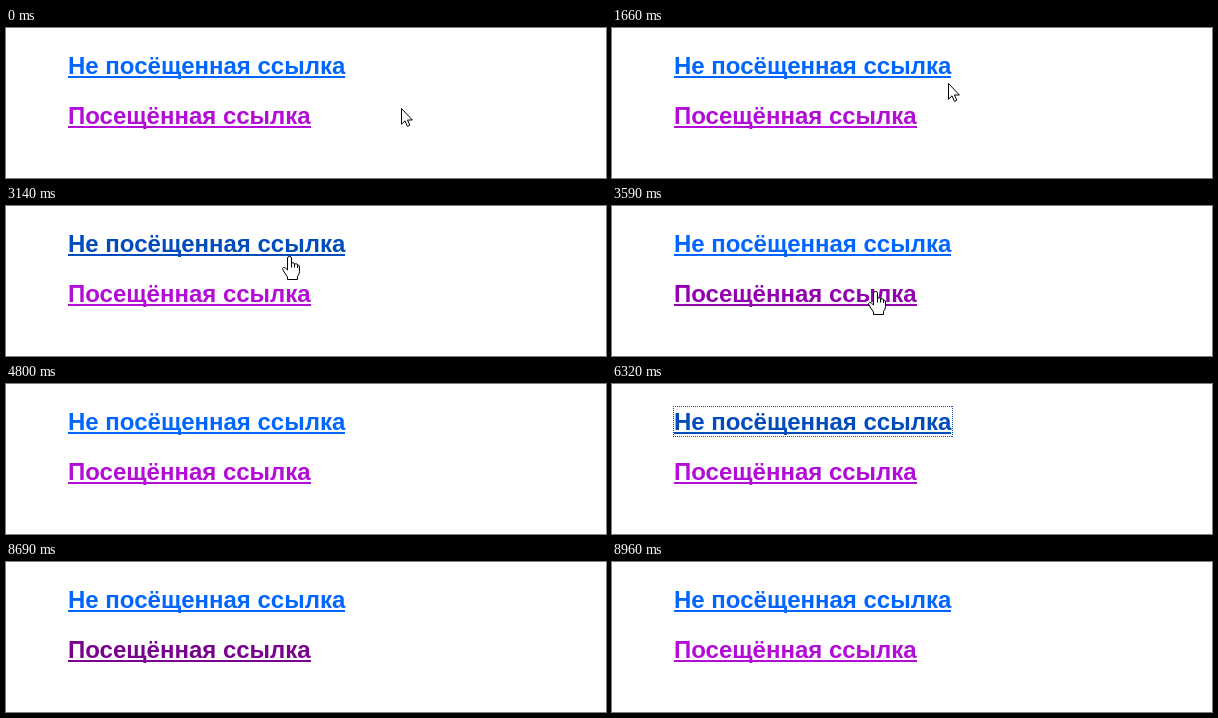
Animation of 600 by 150 pixels, one loop 9840 ms. Source, as an HTML page with a canvas:

```html
<!DOCTYPE html>
<html lang="ru">
<head>
<meta charset="utf-8">
<title>Ссылки</title>
<style>
  html, body { margin: 0; width: 100%; height: 100%; overflow: hidden; background: #fff; }
  .link {
    position: absolute; left: 62px; height: 27px;
    font: bold 24px/27px "Liberation Sans", Arial, sans-serif;
    white-space: nowrap;
  }
  .link::after {
    content: ""; position: absolute; left: 0; top: 24px;
    width: 100%; height: 2px; background: currentColor;
  }
  #fresh { top: 24px; }
  #visited { top: 74px; }
  canvas { position: absolute; left: 0; top: 0; }
</style>
</head>
<body>
<span class="link" id="fresh">Не посёщенная ссылка</span>
<span class="link" id="visited">Посещённая ссылка</span>
<canvas id="stage" width="600" height="150"></canvas>
<script>
const LOOP = 9840;
const ctx = document.getElementById('stage').getContext('2d');
const fresh = document.getElementById('fresh');
const visited = document.getElementById('visited');

const BLUE = [0, 102, 255], BLUE_DARK = [0, 76, 188];
const PURPLE = [178, 12, 214], PURPLE_HOVER = [146, 0, 176], PURPLE_FOCUS = [107, 0, 125];

// Pointer keys: time, x, y; the pose holds until the next key.
const pointer = [
  [0, 395, 80], [1300, 394, 80], [1480, 384, 76], [1570, 362, 66],
  [1660, 336, 55], [1750, 311, 51], [1840, 292, 49], [1930, 285, 49],
  [3140, 284, 50], [3230, 282, 54], [3320, 277, 64], [3410, 271, 75],
  [3500, 266, 82], [3590, 264, 85], [4520, 264, 89], [4610, 264, 106],
  [4700, 264, 130], [4800, 264, 160]
];
const ticks = pointer.map(k => k[0]).concat([6320, 7580, 7680, 8690, 8780, 8960]);

// Colour changes: start, duration, colour.
const freshFades = [
  [0, 0, BLUE], [1750, 0, BLUE_DARK], [3180, 270, BLUE],
  [6320, 0, BLUE_DARK], [7470, 210, BLUE]
];
const visitedFades = [
  [0, 0, PURPLE], [3410, 0, PURPLE_HOVER], [4560, 240, PURPLE],
  [7580, 0, PURPLE_FOCUS], [8640, 270, PURPLE]
];

const css = c => `rgb(${c.map(Math.round).join(',')})`;

function colourAt(fades, t) {
  let i = fades.length - 1;
  while (fades[i][0] > t) i--;
  const [start, length, to] = fades[i];
  if (!length) return to;
  const p = Math.min(1, (t - start) / length);
  return fades[i - 1][2].map((v, n) => v + (to[n] - v) * p);
}

function focusRing(x, y, w, h, colour) {
  ctx.fillStyle = css(colour);
  for (let i = 0; i < w; i += 2) {
    ctx.fillRect(x + i, y, 1, 1);
    ctx.fillRect(x + i, y + h - 1, 1, 1);
  }
  for (let j = 0; j < h; j += 2) {
    ctx.fillRect(x, y + j, 1, 1);
    ctx.fillRect(x + w - 1, y + j, 1, 1);
  }
}

const arrow = new Path2D('M.5 .5V16.2L4 12.8L6.4 18.4L8.8 17.3L6.5 12H11.4Z');
const hand = new Path2D(
  'M-2.5 14V2Q-2.5 .5 -.5 .5Q1.5 .5 1.5 2V7Q4.5 6 4.5 8Q7.5 7 7.5 9' +
  'Q9.5 8.7 9.5 11V15.5Q9.5 18 7.5 20.5V23.5H-2.5V21Q-4.5 18.5 -7 14' +
  'Q-8 12 -6.5 11.5Q-5 11 -2.5 14Z');
const knuckles = new Path2D('M1.5 7V11.5M4.5 8V11.5M7.5 9V12');

function drawPointer(x, y, isHand) {
  ctx.save();
  ctx.translate(x, y);
  ctx.fillStyle = '#fff';
  ctx.strokeStyle = '#000';
  ctx.lineWidth = 1;
  const shape = isHand ? hand : arrow;
  ctx.fill(shape);
  ctx.stroke(shape);
  if (isHand) ctx.stroke(knuckles);
  ctx.restore();
}

const overLink = (x, y) => x < 340 && (y < 53 || (y > 71 && y < 103 && x < 305));

function draw(now) {
  const time = now % LOOP;
  const t = ticks.filter(v => v <= time).pop();
  const blue = colourAt(freshFades, t);
  const purple = colourAt(visitedFades, t);
  fresh.style.color = css(blue);
  visited.style.color = css(purple);

  ctx.clearRect(0, 0, 600, 150);
  if (t >= 6320 && t < 7580) focusRing(61, 22, 280, 31, blue);
  if (t >= 7580 && t < 8690) focusRing(61, 72, 245, 31, purple);
  if (t < 4800) {
    const [, x, y] = pointer.filter(k => k[0] <= t).pop();
    drawPointer(x, y, overLink(x, y) || t >= 4520);
  }
}

const begin = performance.now();
function loop() {
  draw(performance.now() - begin);
  requestAnimationFrame(loop);
}
loop();
</script>
</body>
</html>
```
